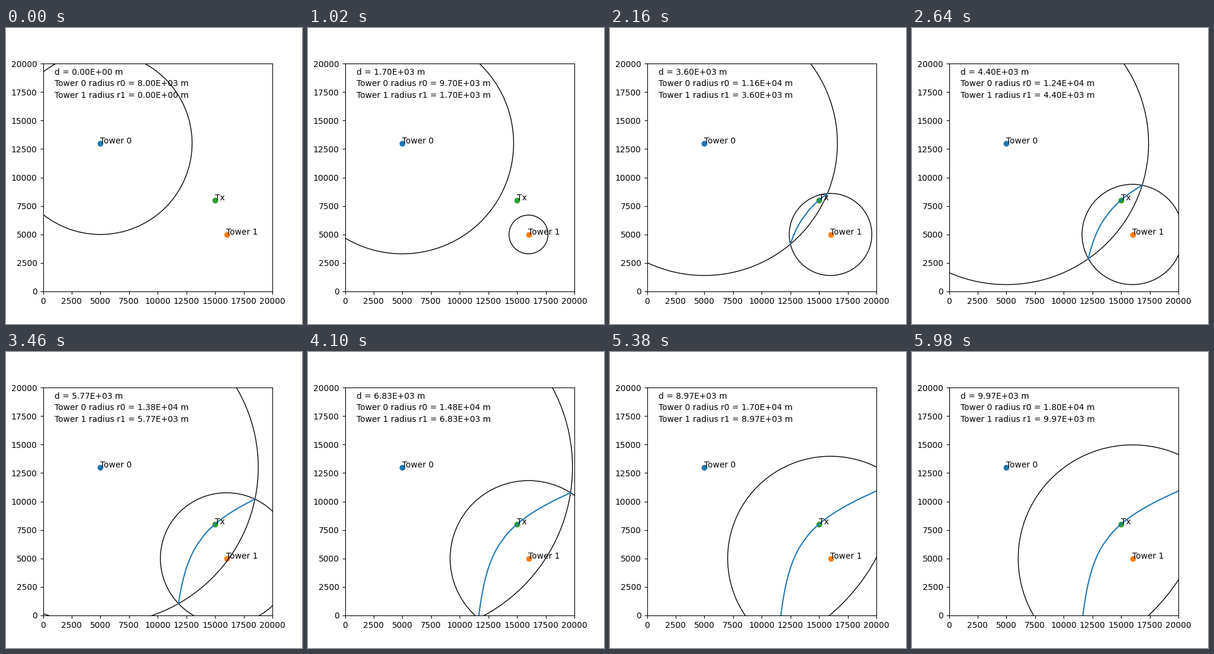
Animation, 500 px wide and 500 px high, one loop 6 s. Source, as a matplotlib script:

```python
import numpy as np
import matplotlib.pyplot as plt
from matplotlib.animation import FuncAnimation
from matplotlib.patches import Circle

FRAMES = 300
INTERVAL = 20
SIZE = 20000
MAX_D = 10000
RANGE_DIFF = 8000  # tower 0 hears the signal this much further out

TOWERS = np.array([[5000, 13000], [16000, 5000]])
TX = (15000, 8000)

plt.rcParams["font.family"] = "DejaVu Sans"


def intersections(r0, r1):
    """Both crossing points of the two tower circles, or None."""
    axis = TOWERS[1] - TOWERS[0]
    dist = np.hypot(*axis)
    if r0 + r1 < dist:
        return None
    unit = axis / dist
    a = (r0**2 - r1**2 + dist**2) / (2 * dist)
    h = np.sqrt(max(r0**2 - a**2, 0))
    mid = TOWERS[0] + a * unit
    side = h * np.array([-unit[1], unit[0]])
    return mid + side, mid - side


def distance(i):
    return MAX_D * i / FRAMES


def locus_points(i):
    """Curve traced so far, running from one crossing point to the other."""
    pairs = [p for p in crossings[:i + 1] if p is not None]
    if not pairs:
        return [], []
    first, second = zip(*pairs)
    return np.array(first[::-1] + second).T


crossings = [intersections(RANGE_DIFF + distance(i), distance(i))
             for i in range(FRAMES)]

fig, ax = plt.subplots(figsize=(5, 5), dpi=100)
ax.set_xlim(0, SIZE)
ax.set_ylim(0, SIZE)
ax.set_xticks(range(0, SIZE + 1, 2500))
ax.set_yticks(range(0, SIZE + 1, 2500))

for name, point in zip(("Tower 0", "Tower 1", "Tx"), (*TOWERS, TX)):
    ax.scatter(*point)
    ax.annotate(name, point)

circles = [ax.add_patch(Circle(t, 0, fill=False)) for t in TOWERS]
locus, = ax.plot([], [], color="C0")
labels = [ax.text(1000, y, "") for y in (19000, 18000, 17000)]


def update(i):
    d = distance(i)
    radii = (RANGE_DIFF + d, d)
    for circle, r in zip(circles, radii):
        circle.set_radius(r)
    locus.set_data(*locus_points(i))
    labels[0].set_text(f"d = {d:.2E} m")
    for n, r in enumerate(radii):
        labels[n + 1].set_text(f"Tower {n} radius r{n} = {r:.2E} m")
    return [*circles, locus, *labels]


anim = FuncAnimation(fig, update, frames=FRAMES, interval=INTERVAL,
                     repeat=True, repeat_delay=0)
plt.show()
```
